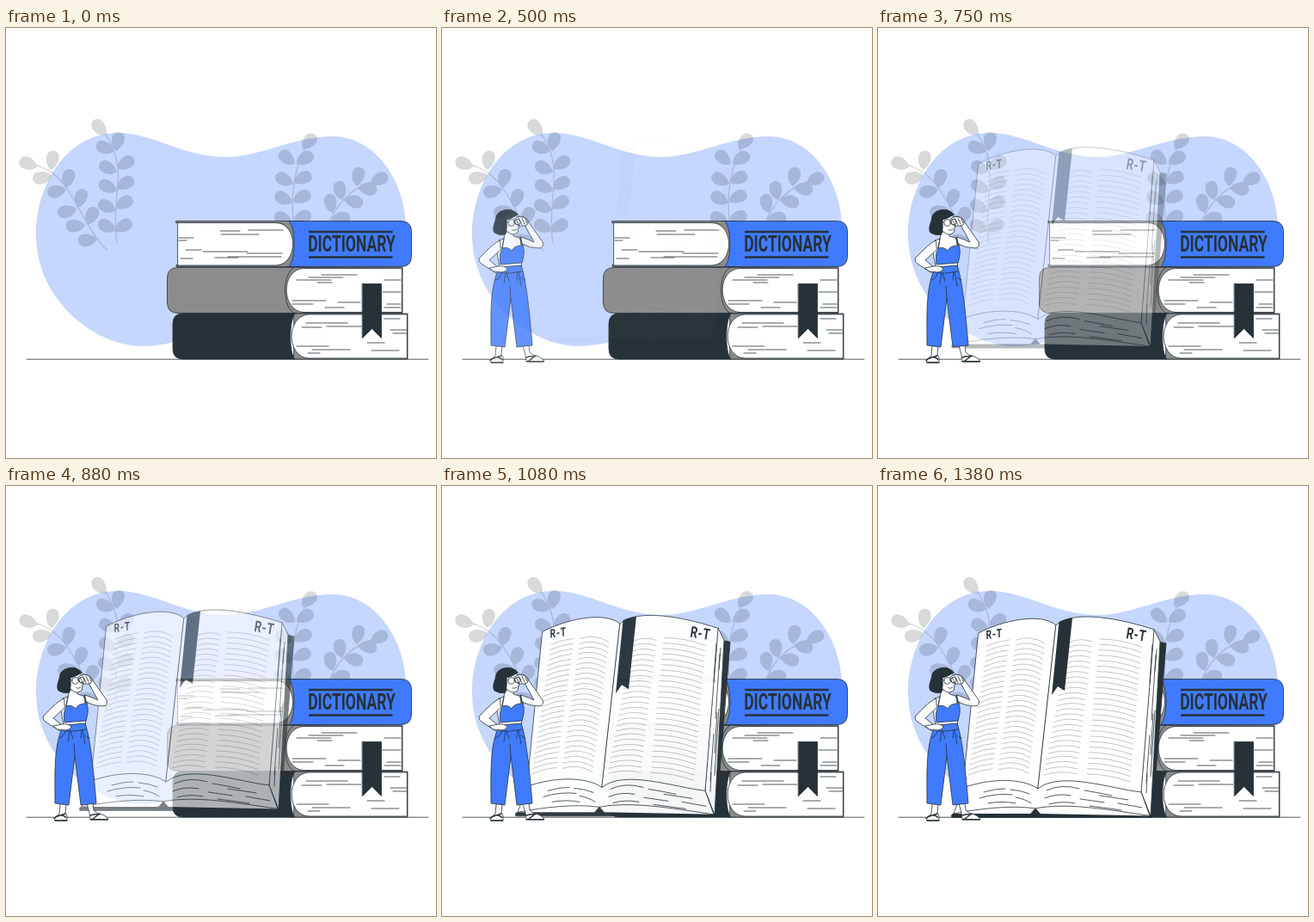
These frames come from a looping animation (500x500 px, 1430 ms). An HTML page:

```html
<!DOCTYPE html>
<html lang="en">
<head>
<meta charset="utf-8">
<title>Dictionary</title>
<style>
  html, body { margin: 0; width: 100%; height: 100%; overflow: hidden; background: #fff; }
  svg { display: block; width: 500px; height: 500px; }
  .ink { stroke: #263238; stroke-width: .8; stroke-linejoin: round; stroke-linecap: round; fill: none; }
  .dark { fill: #263238; }
  .blue { fill: #407bff; }
  .gray { fill: #8c8c8c; }
  .white { fill: #fff; }
  .faint { stroke: #b0b0b0; stroke-width: .75; }
  text { font-family: Roboto, "Liberation Sans", sans-serif; font-weight: 700; fill: #263238; text-anchor: middle; }
</style>
</head>
<body>
<svg viewBox="0 0 500 500">
  <defs>
    <path id="leaf" d="M0 0C4-7 11-9 17-7.5C24-5.5 24 4 18 6C12 8 5 5 0 0Z"/>
  </defs>

  <path fill="#c5d6ff" d="M35 240C35 180 72 122 130 122C172 122 205 150 256 150C295 150 335 126 380 126C430 126 465 180 465 232C465 265 455 290 430 310C390 340 250 345 215 358C195 367 175 370 155 370C100 367 35 315 35 240Z"/>
  <g id="plants"></g>
  <path class="ink" d="M24 385.2H491"/>

  <g id="stack" class="ink">
    <path class="gray" d="M198 224.5H345V277.5H198V275.500H316C338 274 338 228 316 226.500H198Z"/>
    <path class="white" d="M200 226.500H314C340 227 340 275 314 276H200Z"/>
    <path class="blue" d="M329 224.500H459Q471.500 224.500 471.500 237V265Q471.500 277.500 459 277.500H329C337 268 337 234 329 224.500Z"/>
    <path d="M250 240h44M282 235h40M201 244h17M201 247h9M249 236h23M229 260h52M203 268h14M243 267h27M280 262h41M258 266h62M209 258h18"/>

    <path class="gray" d="M335 278.500H200Q187.500 278.500 187.500 291V319Q187.500 331.500 200 331.500H461V278.500Z"/>
    <path class="white" d="M460 279.500H346C319 281 320 329 346 330.500H460Z"/>
    <path d="M335 278.500C321 284 321 326 335 331.500M367 287h41M338 293h40M440 293h19M362 296h17M352 290h40M333 317h39M333 321h24M371 325h22M443 321h16M438 307h21M386 319h26M440 325h19"/>

    <path class="gray" d="M335 332H467V385H335Z"/>
    <path class="dark" d="M336 332H206Q194 332 194 344V373Q194 385 206 385H336C329 378 329 340 336 332Z"/>
    <path class="white" d="M466 333H352C325 335 326 383 352 384H466Z"/>
    <path d="M349 343h48M373 347h40M447 351h19M450 355h16M344 348h23M425 375h32M338 370h37M356 374h44M351 378h14M420 366h20M440 338h18"/>
    <path class="dark" d="M414.500 297.500H436.500V360.500L425.500 349.500L414.500 360.500Z"/>
    <path stroke-width="2.300" stroke-linecap="butt" style="stroke-width:2.300" d="M352 237H449.500M352 266.500H449.500"/>
  </g>
  <text transform="translate(402 260) scale(.7 1)" font-size="25">DICTIONARY</text>

  <g id="book" opacity="0">
    <g class="ink">
      <path class="dark" d="M321 180L335 183L319 385.500H86Q84 382 88 381H310Z"/>
      <path class="white" d="M321 167L328 181L317 384L306 356Z"/>
      <path class="white" d="M117 171L98 350L88 381H179L183 375L189 381L316 383.500L306 356L321 167Z" stroke="none" style="stroke:none"/>
      <path class="white" d="M117 171C145 156 190 147 207 162L186 352C168 340 133 339 99 351Z"/>
      <path class="white" d="M207 162C222 147 265 149 321 167L306 356C270 352 212 331 186 352Z"/>
      <path d="M99 351L88 381C120 375 155 371 183 375C220 368 265 376 316 383.500L306 356"/>
      <path d="M123 356q13-4 25-4M154 353q12 1 22 5M118 363q20-6 38-4M160 362q11 2 18 7M128 369q16-3 32 0M196 354q17-8 38-2M240 354q18 3 32 6M194 363q14-6 30-3M235 364l28 4M258 360l33 5M199 370q15-4 30-1M246 372l37 5M279 369l28 5"/>
      <path d="M319 185l-3 44M323 197l-5 75M320 265l-3 47M316 290l-4 54M322 261l-5 77M313 335l-1 22M324 190l-2 25"/>
      <path class="dark" d="M178 380.500L183 375L188 380.500L183 383Z"/>
    </g>
    <g id="print" class="ink faint"></g>
    <path class="dark" d="M210.500 158Q218 154 226 153.500L217 238L209 233L202 243Z"/>
    <text transform="translate(135.500 177) rotate(-8) skewX(-6) scale(.72 1)" font-size="14" letter-spacing="1.500">R-T</text>
    <text transform="translate(299.500 179) rotate(9) scale(.72 1)" font-size="18" letter-spacing="1">R-T</text>
  </g>

  <g id="woman" class="ink" opacity="0">
    <g class="white">
      <path d="M63 370L62 381Q55 386 57 389H70Q73 385 69 380L70 370Z"/>
      <path d="M94 369L97 380Q97 386 99 388H118Q119 385 112 382Q105 381 102 377L101 369Z"/>
      <path d="M92 243Q101 246 107 249L96 229Q90 231 86 226Q84 221 90 219Q98 219 101 226L117 249Q119 255 113 256Q102 256 93 251Z"/>
      <path d="M73 238L72 245Q65 246 62 251L68 283H92L94 252L90 244L83 242V236Z"/>
      <path d="M67 247Q60 250 43 268Q42 272 47 275L63 285Q71 288 76 282Q73 277 65 278L55 270L68 258Z"/>
      <path d="M73 222Q76 215 86 217L90 226L88 238Q82 243 75 236Z"/>
    </g>
    <path class="dark" d="M88 217Q84 210 73 211.500Q62 214 62 224Q58 234 61 238Q67 242 74 240Q76 231 75 223Q81 222 88 217Z"/>
    <path class="white" d="M84 222Q90 217 97 221Q102 225 99 229Q91 232 86 228Z"/>
    <path d="M86 222l4 8M89 221l4 8M93 221l3 7M97 222l2 5M82 235q3 1 5-1M75 225l2 1"/>
    <circle cx="80.500" cy="226.500" r="3.800"/><circle cx="88" cy="225.500" r="3.300"/>
    <path class="blue" d="M72 245L70 257Q66 262 68 275L93 273Q97 260 94 254L91 243L92 253Q84 253 81 259Q77 254 70 256Z"/>
    <path class="blue" d="M67 278L92 276C97 290 101 320 105 369L87 371L80 314L73 371L57 369C57 335 55 300 67 278Z"/>
    <path class="white" d="M55 279L65 277Q73 276 76 280Q74 284 69 284L60 283Z"/>
    <path d="M68 285Q80 286 93 283M74 285l-2 12M75 285l3 9M89 284l3 16M88 284l-1 9M62 293q5-1 7-7M80 314l-1-14M92 290q3 3 5 3"/>
    <path d="M56 386.500q8-7 14-1M57 389h14M60 384l9-3M98 387.800h20.500M98 383q6-2 10-1M101 387l8-6" style="stroke-width:1.500"/>
  </g>
</svg>

<script>
const LOOP = 1430, FIRST_CHANGE = 130, LAST_CHANGE = 1380;
const WOMAN_START = -35, BOOK_START = 443, DURATION = 1000;
const DROP = 19, OVERSHOOT = 1.044;
const byId = id => document.getElementById(id);

// Each leaf is base x, base y, direction in degrees.
const plants = [
  { stem: "M129 250C126 230 128 205 130 180C132 155 126 140 115 122",
    leaves: "117 124 -132,126 143 -158,128 143 -77,129 167 -154,130 164 -34,129 189 -154,129 187 -30,128 212 -154,128 210 -32,128 235 -154,127 237 -32" },
  { stem: "M118 259C98 240 84 205 70 185Q55 165 36 160",
    leaves: "37 161 -160,53 165 -82,53 171 168,70 186 -75,70 187 169,84 209 -72,82 210 167,95 229 -64,92 229 178,106 245 175" },
  { stem: "M334 224C331 190 335 160 352 133",
    leaves: "345 141 -48,336 158 -140,338 158 -30,334 181 -152,335 180 -25,333 203 -152,334 202 -25,333 226 -155,334 225 -22" },
  { stem: "M377 224C385 205 402 184 432 177",
    leaves: "424 182 -28,408 184 -80,409 186 8,391 200 -100,393 200 12,380 215 -100,378 223 -5" }
];

byId("plants").innerHTML = plants.map(({ stem, leaves }) =>
  `<g opacity=".18" fill="#263238"><path d="${stem}" fill="none" stroke="#263238" stroke-width="1.3"/>` +
  leaves.split(",").map(leaf => {
    const [x, y, angle] = leaf.split(" ");
    return `<use href="#leaf" transform="translate(${x} ${y}) rotate(${angle})"/>`;
  }).join("") + "</g>").join("");

// Columns of curved text lines that lean with the page.
function column({ x, y, lean, height, width, widen, bend, fall, rows = 26 }) {
  let d = "";
  for (let i = 0; i < rows; i++) {
    const k = i / (rows - 1), w = width + widen * k;
    d += `M${x + lean * k} ${y + height * k}q${w / 2} ${bend} ${w} ${fall}`;
  }
  return `<path d="${d}"/>`;
}

byId("print").innerHTML = [
  { x: 127, y: 186, lean: -22, height: 150, width: 26, widen: 2, bend: -6, fall: -7 },
  { x: 161, y: 179, lean: -21, height: 151, width: 33, widen: 2, bend: -6, fall: 4 },
  { x: 222, y: 182, lean: -29, height: 154, width: 27, widen: 11, bend: -6, fall: -1 },
  { x: 258, y: 178, lean: -15, height: 157, width: 48, widen: 2, bend: 0, fall: 9 }
].map(column).join("");

const bezier = (s, a, b) => 3 * (1 - s) ** 2 * s * a + 3 * (1 - s) * s * s * b + s ** 3;

// cubic-bezier(.36, -.01, .5, 1.38)
function ease(x) {
  if (x <= 0) return 0;
  if (x >= 1) return 1;
  let low = 0, high = 1;
  for (let i = 0; i < 20; i++) {
    const mid = (low + high) / 2;
    if (bezier(mid, .36, .5) < x) low = mid; else high = mid;
  }
  return bezier(low, -.01, 1.38);
}

const clamp = v => Math.max(0, Math.min(1, v));

function draw() {
  const t = Math.min(performance.now() % LOOP, LAST_CHANGE);
  const woman = t < FIRST_CHANGE ? 0 : ease((t - WOMAN_START) / DURATION);
  const book = ease((t - BOOK_START) / DURATION);
  byId("woman").setAttribute("opacity", clamp(woman));
  byId("book").setAttribute("opacity", clamp(book));
  byId("book").setAttribute("transform", `translate(0 ${DROP * (book - OVERSHOOT)})`);
  requestAnimationFrame(draw);
}
draw();
</script>
</body>
</html>
```
